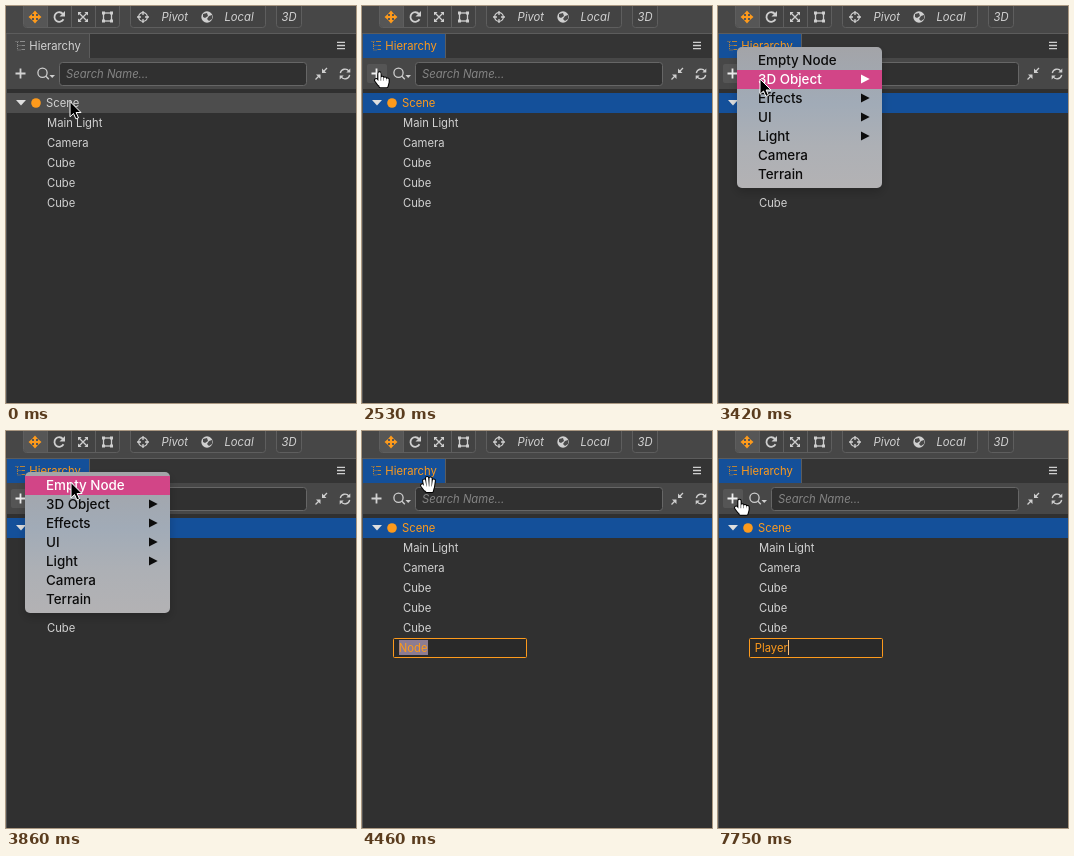
Recreate the animation shown at these times as an HTML page. Size 350 by 397 pixels, loop 8 s.

```html
<!DOCTYPE html>
<html lang="en">
<head>
<meta charset="utf-8">
<title>Hierarchy panel</title>
<style>
html, body { margin: 0; height: 100%; overflow: hidden; background: #303030; }
svg { display: block; width: 100vw; height: 100vh; }
text { font: 11.25px Inter, "Liberation Sans", sans-serif; fill: #d2d2d2; white-space: pre; }
.italic text { font-style: italic; }
.menu text { font: 500 13.4px Inter, "Liberation Sans", sans-serif; fill: #0c0c0c; }
.line { fill: none; stroke: #cfcfcf; stroke-width: 1.3; }
.box { fill: #434343; stroke: #5e5e5e; }
.accent { fill: #fd9a1c; }
.round { stroke-linecap: round; stroke-linejoin: round; }
</style>
</head>
<body>
<svg viewBox="0 0 350 397" preserveAspectRatio="none">
  <defs>
    <linearGradient id="glass" x2="0" y2="1">
      <stop offset="0" stop-color="#a3a4a8"/>
      <stop offset=".4" stop-color="#a1abb7"/>
      <stop offset=".7" stop-color="#adb0b5"/>
      <stop offset="1" stop-color="#b3b2b4"/>
    </linearGradient>
    <filter id="shadow" x="-20%" y="-20%" width="140%" height="150%">
      <feDropShadow dx="0" dy="4" stdDeviation="5" flood-opacity=".2"/>
    </filter>
    <path id="fingers" d="M-3.3 3L-4.6-3.8M-1 2L-1.7-6.3M1.6 2L1.8-6M4 3L5-3.8M-3.5 5L-6.6 1M-3 3H3.8L3 6.5H-2Z"/>
    <path id="pointing" d="M1.5 1.5V10M4.3 6V10M7 6.7V10M9.5 7.6V10.5M-1.8 8.2L1 12M1.5 10H9.5L8.5 14H2.5Z"/>
  </defs>

  <rect width="350" height="397" fill="#303030"/>
  <rect width="350" height="28" fill="#474747"/>

  <!-- main toolbar -->
  <rect class="box" x="17.5" y="-6" width="96" height="27.5" rx="3"/>
  <path d="M18 0H41V21H20Q18 21 18 19Z" fill="#565656"/>
  <path d="M41.5 0V21M65.5 0V21M89.5 0V21" stroke="#5e5e5e"/>
  <rect class="box" x="124.5" y="-6" width="135" height="27.5" rx="3"/>
  <rect class="box" x="270.5" y="-6" width="25" height="27.5" rx="3"/>
  <path class="accent" d="M29 4.5L32 8H30V10H32V8L35.5 11 32 14V12H30V14H32L29 17.5 26 14H28V12H26V14L22.5 11 26 8V10H28V8H26Z"/>
  <path class="line" d="M57 8A4.8 4.8 0 1 0 57.5 13.3" style="stroke-width:1.8"/>
  <path d="M59 5V10.5H53.5Z" fill="#cfcfcf"/>
  <path class="line" d="M73 7L81 15M81 7L73 15"/>
  <path d="M72 6H75.6L72 9.6ZM82 6V9.6L78.4 6ZM72 16V12.4L75.6 16ZM82 16H78.4L82 12.4Z" fill="#cfcfcf"/>
  <rect class="line" x="97.5" y="7" width="8" height="8"/>
  <path d="M96 5.5H99V8.5H96ZM104 5.5H107V8.5H104ZM96 13.5H99V16.5H96ZM104 13.5H107V16.5H104Z" fill="#cfcfcf"/>
  <circle class="line" cx="137" cy="11" r="4.3"/>
  <path class="line" d="M137 5V9M137 13V17M131 11H135M139 11H143"/>
  <circle cx="201" cy="11" r="5.7" fill="#cfcfcf"/>
  <path d="M197 8L201 7 202 10 199 12 197 11ZM203 10L206 9 206 13 203 15 201 13Z" fill="#4a4a4a"/>
  <g class="italic">
    <text x="155.5" y="15">Pivot</text>
    <text x="218.5" y="15">Local</text>
    <text x="275.5" y="15">3D</text>
  </g>

  <!-- panel header -->
  <rect x="84" y="28" width="266" height="24" fill="#343434"/>
  <rect id="tab" x="1" y="28" width="83" height="24"/>
  <path d="M0 27.5H350M83.5 28V52" stroke="#5c5c5c"/>
  <g id="tree" fill="none">
    <path d="M9.5 35.5H13M11.5 36V44M11.5 39.5H15M11.5 44H15" stroke-dasharray="1 1"/>
    <path d="M14 35.5H19M15.5 39.5H19M15.5 43.5H19"/>
  </g>
  <text id="title" x="23.3" y="44">Hierarchy</text>
  <path class="line" d="M331 36.3H339M331 39.5H339M331 42.7H339"/>

  <!-- search bar -->
  <rect y="52" width="350" height="31" fill="#474747"/>
  <rect id="hover" x="5" y="58" width="20" height="19" rx="2" fill="#555"/>
  <path id="plus" d="M9.5 67.5H19.5M14.5 62.5V72.5" stroke-width="1.8"/>
  <circle class="line" cx="36.5" cy="66.8" r="4.6"/>
  <path class="line" d="M40 70.3L42.8 73.2"/>
  <path d="M43.5 69H49L46.2 72Z" fill="#cfcfcf"/>
  <rect x="53.5" y="56.5" width="247" height="23" rx="3" fill="#303030" stroke="#666"/>
  <g class="italic"><text x="60" y="72" style="fill:#858585">Search Name...</text></g>
  <path class="line" d="M321 62L316.8 66.2M309.5 73.5L313.7 69.3"/>
  <path d="M316 62.5V67H320.5ZM310 68.5H314.5V73Z" fill="#cfcfcf"/>
  <path class="line" d="M334.3 67A4.8 4.8 0 0 1 343 65.3M343.7 69A4.8 4.8 0 0 1 335 70.7"/>
  <path d="M344.3 62.5V66.5H340.3ZM333.7 73.5V69.5H337.7Z" fill="#cfcfcf"/>

  <!-- node tree -->
  <rect id="row" x="1" y="87" width="349" height="20"/>
  <path d="M10 94H20L15 99.5Z" fill="#dedede"/>
  <circle class="accent" cx="30" cy="97" r="4.8"/>
  <text id="scene" x="40" y="101">Scene</text>
  <g id="nodes"></g>
  <g id="edit">
    <rect x="31.5" y="207.5" width="133" height="19" rx="1" fill="#292929" stroke="#fd9a1c"/>
    <rect id="selection" x="37" y="209" width="29" height="15" fill="#8d7c92"/>
    <text id="name" x="36.8" y="221" style="fill:#fd9a1c"></text>
    <rect id="caret" y="209" width="1" height="15" fill="#ffc078"/>
  </g>
  <path d="M.5 28V397" stroke="#555"/>

  <g id="menu" class="menu"></g>
  <g id="submenu" class="menu"></g>

  <g id="arrow"><path d="M0 0V15.3L3.5 12 5.9 17.4 8.5 16.3 6.1 11H11Z" stroke="#fff"/></g>
  <g id="grab" class="round"><use href="#fingers" stroke="#000" stroke-width="4.2"/><use href="#fingers" stroke="#fff" fill="#fff" stroke-width="2.2"/></g>
  <g id="point" class="round"><use href="#pointing" stroke="#000" stroke-width="4.4"/><use href="#pointing" stroke="#fff" fill="#fff" stroke-width="2.3"/></g>
</svg>
<script>
const LOOP = 8000, ROW = 19, BLUE = '#14509a', ORANGE = '#fd9a1c', LIGHT = '#d2d2d2';
const $ = id => document.getElementById(id);
const show = (id, on) => $(id).style.display = on ? '' : 'none';
const fill = (id, color) => $(id).style.fill = color;

// Time, cursor shape, position
const moves = [
  [0, 'arrow', 64, 95.5], [1790, 'grab', 43.8, 52.5], [1940, 'grab', 39, 40], [2090, 'grab', 31, 43],
  [2240, 'grab', 24, 49], [2380, 'arrow', 18, 61], [2530, 'point', 16, 66],
  [2830, 'arrow', 16, 66], [3270, 'arrow', 26, 70], [3420, 'arrow', 42, 73], [3560, 'arrow', 55, 71],
  [3710, 'arrow', 63, 65], [3860, 'arrow', 65, 51.5],
  [4310, 'grab', 66.8, 53.5], [7150, 'grab', 53, 50], [7300, 'arrow', 31, 61], [7450, 'point', 20, 68.5]
];
const typing = [[0, 'Node'], [5510, 'P'], [5810, 'Pla'], [6260, 'Play'], [6560, 'Playe'], [6700, 'Player']];
const at = (steps, t) => steps.findLast(s => s[0] <= t);

function buildMenu(id, x, y, width, items, parents = []) {
  const rows = items.map((label, i) => {
    const mid = y + 13 + i * ROW;
    const mark = parents.includes(i) ? `<path d="M${x + 124} ${mid - 4.5}v9l8.7-4.5z"/>` : '';
    return `<g class="item"><rect x="${x}" y="${mid - 9}" width="${width}" height="${ROW}" fill="#d24587"/>
      <text x="${x + 21}" y="${mid + 5}">${label}</text>${mark}</g>`;
  });
  $(id).innerHTML = `<rect x="${x}" y="${y}" width="${width}" height="${items.length * ROW + 8}"
    rx="5" fill="url(#glass)" filter="url(#shadow)"/>` + rows.join('');
}

function highlight(id, index) {
  $(id).querySelectorAll('.item').forEach((item, i) => {
    const on = i === index;
    item.querySelector('rect').style.opacity = on ? 1 : 0;
    item.querySelector('text').style.fill = item.style.fill = on ? '#fff' : '#0c0c0c';
  });
}

buildMenu('menu', 19, 41, 145, ['Empty Node', '3D Object', 'Effects', 'UI', 'Light', 'Camera', 'Terrain'], [1, 2, 3, 4]);
buildMenu('submenu', 164, 60, 95, ['Cube', 'Cylinder', 'Sphere', 'Capsule', 'Cone', 'Torus', 'Plane', 'Quad']);
highlight('submenu', -1);
$('nodes').innerHTML = ['Main Light', 'Camera', 'Cube', 'Cube', 'Cube']
  .map((label, i) => `<text x="41" y="${121 + i * 20}">${label}</text>`).join('');

function draw(t) {
  const within = (a, b) => t >= a && t < b;
  const focused = t >= 450;
  fill('tab', focused ? BLUE : '#474747');
  fill('row', focused ? BLUE : '#4d4d4d');
  fill('title', focused ? ORANGE : LIGHT);
  fill('scene', focused ? ORANGE : LIGHT);
  $('tree').style.stroke = focused ? '#b98336' : '#8c8c8c';

  const hover = within(2530, 4160) || t >= 7450;
  show('hover', hover);
  $('plus').style.stroke = hover ? '#f0f0f0' : LIGHT;

  show('menu', within(2830, 4160));
  show('submenu', within(3560, 3860));
  highlight('menu', t >= 3860 ? 0 : t >= 3270 ? 1 : -1);

  const typed = t >= 5510;
  show('edit', t >= 4310);
  show('selection', !typed);
  $('name').textContent = at(typing, t)[1];
  show('caret', typed && !within(7200, 7700));
  if (typed) $('caret').setAttribute('x', Math.round(36.7 + $('name').getComputedTextLength()));

  const [, shape, x, y] = at(moves, t);
  for (const id of ['arrow', 'grab', 'point']) show(id, id === shape);
  $(shape).setAttribute('transform', `translate(${x} ${y})`);
}

const start = performance.now();
function tick() {
  draw((performance.now() - start) % LOOP);
  requestAnimationFrame(tick);
}
tick();
</script>
</body>
</html>
```
